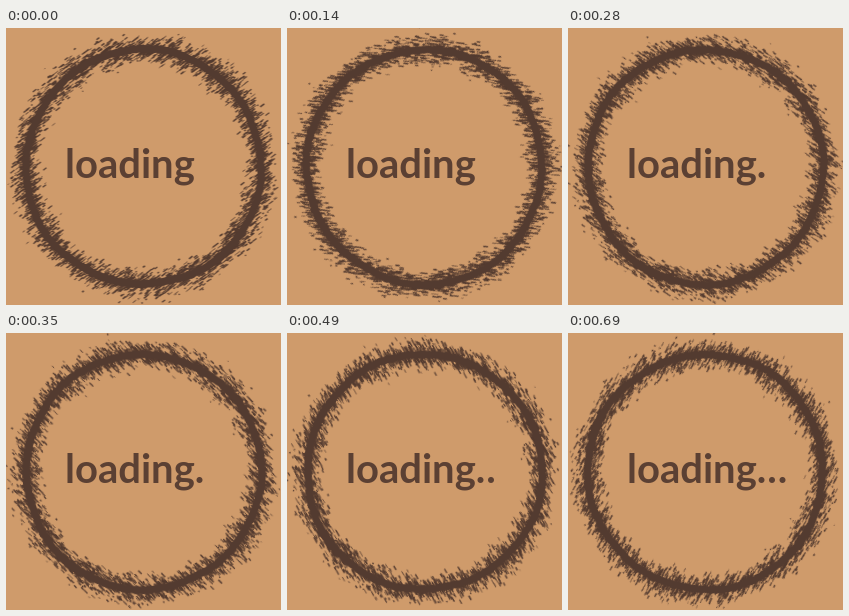
An HTML page with a canvas for the animation above (760 ms loop, 275 by 277 pixels).

```html
<!DOCTYPE html>
<html lang="en">
<head>
<meta charset="utf-8">
<title>Loading</title>
<style>
  html, body { margin: 0; width: 100%; height: 100%; overflow: hidden; background: #cf9b6b; }
  canvas, svg { position: absolute; left: 0; top: 0; }
  text { font: 700 40px Lato, "Open Sans", sans-serif; fill: #5b4033; }
  tspan { letter-spacing: 1px; }
</style>
</head>
<body>
<canvas width="275" height="277"></canvas>
<svg width="275" height="277"><text x="59" y="150">loading<tspan></tspan></text></svg>
<script>
const LOOP = 760;
const STARTS = [0, 70, 140, 210, 280, 350, 420, 490, 560, 590, 620, 690];
const CENTER = { x: 137.5, y: 139 }, RADIUS = 117.5, STREAKS = 3600;
const BRISTLE_ANGLE = -37 * Math.PI / 180;
const ctx = document.querySelector('canvas').getContext('2d');
const dots = document.querySelector('tspan');
const ring = paintRing();
let shown = -1;

function seeded(seed) {
  return () => {
    seed = (seed + 0x6D2B79F5) | 0;
    let t = Math.imul(seed ^ seed >>> 15, 1 | seed);
    t = t + Math.imul(t ^ t >>> 7, 61 | t) ^ t;
    return ((t ^ t >>> 14) >>> 0) / 4294967296;
  };
}

// The brushed ring, painted once around the middle of its own canvas
function paintRing() {
  const canvas = document.createElement('canvas');
  canvas.width = canvas.height = 300;
  const brush = canvas.getContext('2d');
  const random = seeded(11);
  const dx = Math.cos(BRISTLE_ANGLE), dy = Math.sin(BRISTLE_ANGLE);
  brush.translate(150, 150);
  brush.strokeStyle = '#533b30';

  for (let i = 0; i < STREAKS; i++) {
    const angle = random() * 2 * Math.PI;
    const spread = 14 + 2 * Math.sin(angle * 5) + 2 * Math.sin(angle * 13);
    const offset = (random() + random() + random() - 1.5) * spread + 0.5;
    const radius = RADIUS + offset;
    const x = radius * Math.cos(angle), y = radius * Math.sin(angle);
    const half = (1 + random() * 4) * (1 - Math.abs(offset) / 36);
    brush.lineWidth = 0.7 + random() * 0.8;
    brush.beginPath();
    brush.moveTo(x - dx * half, y - dy * half);
    brush.lineTo(x + dx * half, y + dy * half);
    brush.stroke();
  }

  brush.lineWidth = 7.5;
  brush.beginPath();
  for (let a = 0; a < 2 * Math.PI; a += 0.025) {
    const radius = RADIUS + Math.sin(a * 3) * 0.7 + Math.sin(a * 8) * 0.5 + random() - 0.5;
    brush.lineTo(radius * Math.cos(a), radius * Math.sin(a));
  }
  brush.closePath();
  brush.stroke();
  return canvas;
}

// Half a turn per loop, slower in the middle
function draw(step) {
  const turn = step / STARTS.length;
  ctx.clearRect(0, 0, 275, 277);
  ctx.save();
  ctx.translate(CENTER.x, CENTER.y);
  ctx.rotate(Math.PI * turn + 0.26 * Math.sin(2 * Math.PI * turn));
  ctx.drawImage(ring, -150, -150);
  ctx.restore();
  dots.textContent = '.'.repeat(Math.floor(step / 3));
}

function tick() {
  const time = performance.now() % LOOP;
  const step = STARTS.filter(start => start <= time).length - 1;
  if (step !== shown) draw(shown = step);
  requestAnimationFrame(tick);
}
tick();
</script>
</body>
</html>
```
